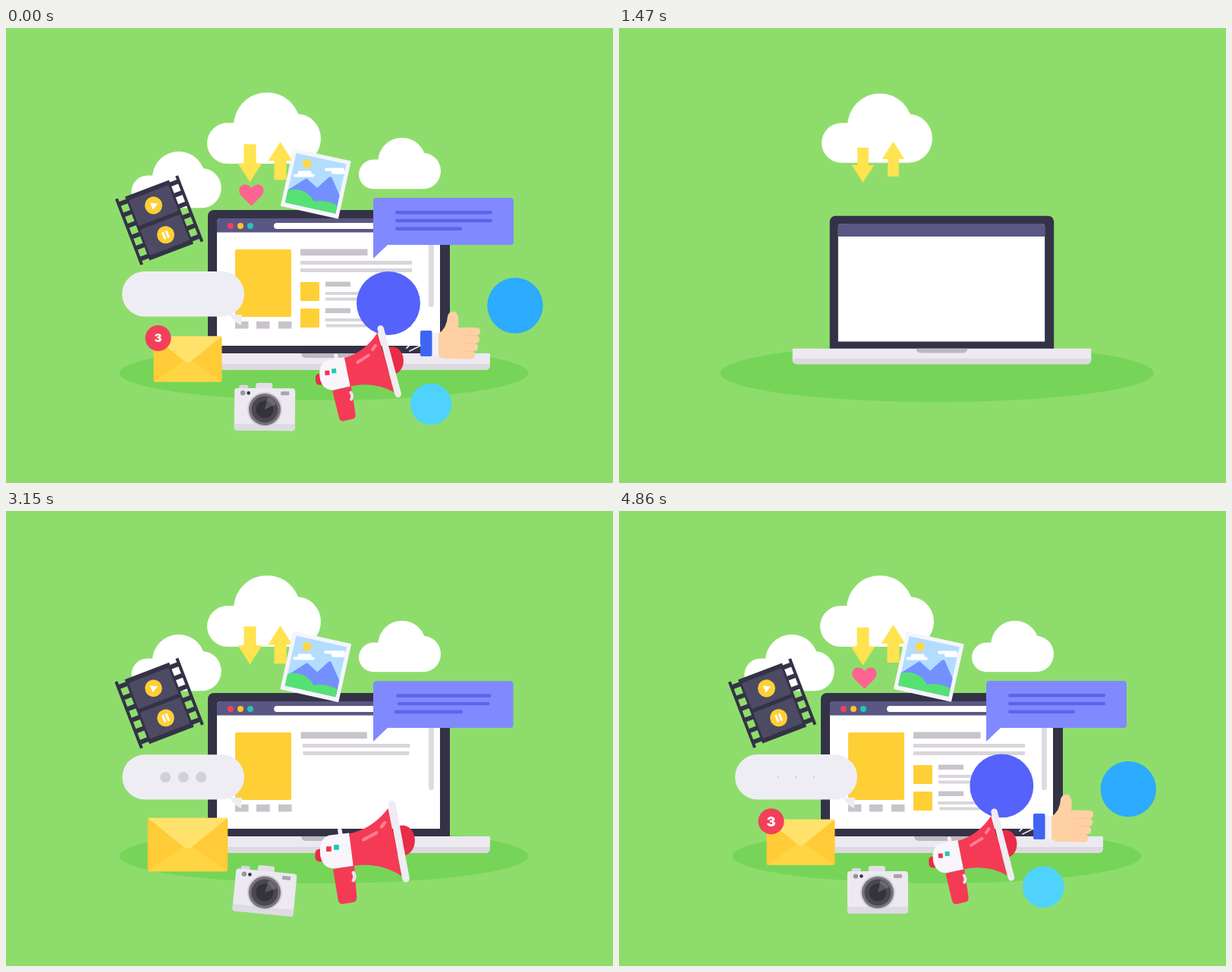
Write an HTML page with a canvas that moves like this. It is 800 px wide and 600 px high and loops after 4890 ms.

```html
<!DOCTYPE html>
<html lang="en">
<head>
<meta charset="utf-8">
<title>Social media laptop</title>
<style>
html, body { margin: 0; width: 100%; height: 100%; overflow: hidden; background: #8edd6c; }
canvas { display: block; width: 800px; height: 600px; }
</style>
</head>
<body>
<canvas id="stage" width="800" height="600"></canvas>
<script>
const c = document.getElementById('stage').getContext('2d');
const LOOP = 4890, CUT = 1310, TAU = Math.PI * 2;
const GREEN = '#8edd6c', YELLOW = '#ffcf36', RED = '#f53a56', TEAL = '#1fc8b8',
      GREY = '#c9c3cb', PALE = '#ece9f1', DARK = '#343247', WHITE = '#fff';
let t = 0;

const clamp = v => Math.max(0, Math.min(1, v));
const easeOut = (start, span) => 1 - (1 - clamp((t - start) / span)) ** 3;

// Elastic entrance: 0 before start, overshoots to about 1.2, settles at 1.
function pop(start) {
  const p = (t - start) / 610;
  return p <= 0 ? 0 : 1 - Math.exp(-3.1 * p) * Math.cos(TAU * p);
}

// Draws in stage coordinates, scaled and turned about (x, y).
function about(x, y, scale, draw, deg = 0) {
  if (scale <= 0) return;
  c.save();
  c.translate(x, y);
  c.rotate(deg * Math.PI / 180);
  c.scale(scale, scale);
  c.translate(-x, -y);
  draw();
  c.restore();
}

// Draws in local coordinates with the origin at (x, y).
function at(x, y, scale, draw, deg = 0) {
  about(x, y, scale, () => { c.translate(x, y); draw(); }, deg);
}

function box(x, y, w, h, r, color) {
  c.fillStyle = color;
  c.beginPath();
  c.roundRect(x, y, w, h, r);
  c.fill();
}

function disc(x, y, r, color, ry = r) {
  if (r <= 0) return;
  c.fillStyle = color;
  c.beginPath();
  c.ellipse(x, y, r, ry, 0, 0, TAU);
  c.fill();
}

function shape(path, color) {
  c.fillStyle = color;
  c.fill(new Path2D(path));
}

function line(path, color, width) {
  c.strokeStyle = color;
  c.lineWidth = width;
  c.lineCap = 'round';
  c.stroke(new Path2D(path));
}

const popBox = (start, x, y, w, h, r, color) =>
  about(x + w / 2, y + h / 2, pop(start), () => box(x, y, w, h, r, color));
const popDisc = (start, x, y, r, color) => disc(x, y, r * pop(start), color);

function cloud(x, y, scale) {
  at(x, y, scale, () => {
    box(-75, -7, 140, 54, 27, WHITE);
    disc(43, 14, 32, WHITE, 33);
    disc(4, -3, 44, WHITE);
  });
}

function arrows() {
  const bob = -3 * Math.sin(TAU * (t - 4860) / 3000);
  const size = easeOut(1380, 160);
  const arrow = 'M-8-25H8V0H16L0 25L-16 0H-8Z';
  at(321.5, 178.5 + bob, size, () => shape(arrow, '#ffe34f'));
  at(361.5, 175 - bob, size, () => shape(arrow, '#ffe34f'), 180);
}

function laptop() {
  about(425, 345.5, pop(1333), () => {
    box(266, 240, 319, 192, [8, 8, 0, 0], DARK);
    box(278, 251, 294, 168, [5, 5, 0, 0], WHITE);
    box(278, 251, 294, 18.5, [5, 5, 0, 0], '#5b5784');
    popDisc(1650, 296, 261, 4, '#f4405a');
    popDisc(1740, 309, 261, 4, '#ffc526');
    popDisc(1850, 322, 261, 4, TEAL);
    popBox(1910, 353, 257, 160, 8, 4, WHITE);
    popBox(1785, 557, 283, 7, 85, 3, '#dedbe2');
    popBox(1785, 302, 292, 74, 89, 2, YELLOW);
    [302, 330, 359].forEach((x, i) => popBox(2230 + 50 * i, x, 387, 17.5, 9.5, 0, GREY));
    popBox(2440, 388, 291.5, 88.5, 8.5, 0, GREY);
    popBox(2512, 388, 307, 147, 5, 0, '#d9d5db');
    popBox(2615, 388, 317, 147, 5, 0, '#d9d5db');
    [335, 370].forEach((y, i) => {
      const start = 3210 + 490 * i;
      popBox(start, 388, y, 25, 25, 1, YELLOW);
      popBox(start + 60, 421, y - .5, 33, 6.5, 0, GREY);
      popBox(start + 345, 421, y + 13, 114, 4, 0, '#d9d5db');
      popBox(start + 480, 421, y + 20.5, 114, 4, 0, '#d9d5db');
    });
    box(213, 429, 425, 22, [1, 1, 6, 6], PALE);
    box(213, 443, 425, 8, [0, 0, 6, 6], '#ddd9e0');
    box(389, 429, 73, 6, [0, 0, 6, 6], '#bdb9bf');
  });
}

function film() {
  at(202, 253.5, pop(2305), () => {
    box(-31, -45, 62, 90, 0, DARK);
    for (const x of [-44.5, 40.5]) box(x, -46.5, 4, 93, 0, DARK);
    for (let i = 0; i < 6; i++) {
      const y = -41.75 + 15.5 * i;
      box(-44, y, 14, 6, 0, DARK);
      box(30, y, 14, 6, 0, DARK);
    }
    box(-28, -39, 56, 36.5, 2, '#4d4a63');
    box(-28, 2.5, 56, 36.5, 2, '#4d4a63');
    popDisc(2495, 0, -21, 11.5, YELLOW);
    popDisc(2480, 1, 21, 11.5, YELLOW);
    at(0, -21, pop(2660), () => shape('M-3-5L6 0L-3 5Z', WHITE));
    at(1, 21, pop(2700), () => shape('M-4-5h3v10h-3zM1-5h3v10h-3z', WHITE));
  }, -21);
}

function photo() {
  at(408.3, 205.2, pop(2230), () => {
    box(-39, -39, 78, 78, 1, '#f6f5fa');
    c.beginPath();
    c.rect(-34, -34, 68, 67);
    c.clip();
    box(-34, -34, 68, 67, 0, '#b3ddff');
    popDisc(2660, -17, -23, 6, '#ffd64a');
    at(-18, -9, pop(2700), () => { box(-14, 0, 28, 4, 2, WHITE); box(-8, -4, 18, 5, 2, WHITE); }, -12);
    at(22, -24, pop(2740), () => { box(-15, -2, 26, 4, 2, WHITE); box(-6, 1, 20, 5, 2, WHITE); }, -12);
    about(12, 34, pop(2570), () =>
      shape('M-36 18L-15-3Q-13-5-11-3L3 5L15-12Q17-14 19-12L36 11V36H-36Z', '#7390ff'));
    about(-20, 34, pop(2510), () => disc(-20, 36, 27, '#56e273', 23));
    about(20, 34, pop(2600), () => disc(20, 38, 29, '#56e273', 18));
  }, 12.5);
}

function chat() {
  about(484, 304, pop(2000), () => {
    box(484, 224, 185, 62, [4, 4, 4, 0], '#808afe');
    shape('M484 285H504L484 304Z', '#808afe');
    [128, 128, 88].forEach((w, i) =>
      popBox(2460 + 130 * i, 513, 241 + 10.7 * i, w, 4.6, 2, '#5d64ec'));
  });
}

function typing() {
  about(313, 392, pop(1920), () => {
    box(153, 321, 161, 59.5, 29.7, '#efedf4');
    shape('M290 378H311L310 392Q300 388 296 379Z', '#efedf4');
    if (t < 2530) return;
    const phase = (t - 2530) % 1410;
    const shrink = 1 - clamp((phase - 780) / 175);
    [210, 233.5, 257].forEach((x, i) =>
      disc(x, 351, 7 * shrink * clamp((phase - 200 * i) / 95), '#d2cfd6'));
  });
}

// Rest-and-lean cycle shared by the megaphone and the envelope.
const lean = () => t < 3690 ? 0 : (1 - Math.cos(TAU * (t - 3690) / 870)) / 2;

function envelope() {
  at(239.5, 440 - 4 * lean(), pop(2950), () => {
    box(-45, -30, 90, 60, 2, '#ffcb36');
    shape('M-44 30L0-2L44 30Z', '#ffd544');
    shape('M-45-30H45L4 3Q0 6-4 3Z', '#ffe26c');
  });
  at(200.5, 412 - 3.5 * lean(), pop(3293), () => {
    disc(0, 0, 17, '#f43f5a');
    if (t < 3680) return;
    const phase = (t - 3680) % 1740;
    at(0, 0, clamp(phase / 180) * (1 - clamp((phase - 1180) / 180)), () => {
      c.fillStyle = WHITE;
      c.font = '900 18px Inter, sans-serif';
      c.textAlign = 'center';
      c.fillText('3', 0, 6.5);
    });
  });
}

function camera() {
  at(341, 502, pop(2700), () => {
    box(-34, -31, 12, 8, 2, '#d9d6e0');
    box(-12, -34, 22, 12, 3, '#e2dfe8');
    box(-40, -27, 80, 56, 4, PALE);
    box(-40, 20, 80, 9, [0, 0, 4, 4], '#dedbe4');
    disc(-29, -20.5, 3.2, '#98949f');
    disc(-21.5, -20.5, 2.3, DARK);
    box(21, -23, 11, 5, 1, '#a9a5b0');
    disc(0, 1, 23, '#d3d0d8');
    disc(0, 1, 21, '#77747d');
    disc(0, 1, 17.5, '#4b4851');
    disc(0, 1, 11.5, '#34323a');
    shape('M0 1L4-15Q12-13 15-6Z', '#ffffff30');
    const flash = 1 - Math.abs(t - 5440) / 130;
    at(32, -22, flash, () => shape('M0-9Q2-2 9 0Q2 2 0 9Q-2 2-9 0Q-2-2 0-9Z', WHITE));
  }, 10 * Math.sin(TAU * (t - 4870) / 2900));
}

function megaphone() {
  about(450, 515, pop(2780), () => {
    disc(515, 443, 14.5, '#e92c49', 18);
    shape('M433 477L458 472L461 510Q461 515 457 516L444 518Q440 518 439 513Z', RED);
    line('M457 481Q460 486 457 490', '#e8e4ec', 4);
    line('M441 431L442 437', '#f5f3f7', 5);
    box(412, 453, 12, 15, 5, '#e92c49');
    shape('M428 437L452 434L457 473L433 476Q421 475 418 461Q416 441 428 437Z', '#f8f6fa');
    shape('M452 435Q480 429 498 405L514 485Q488 468 457 473Z', RED);
    line('M469 442L484 434M490 427L494 422', '#ff7d95', 4);
    line('M502.5 400L519 488', '#efecf3', 8.5);
    box(425, 450, 6, 6, 0, '#f4324e');
    box(434, 448, 6, 6, 0, TEAL);
  }, -5 * lean());
  const phase = (t - 3690) % 870;
  if (t > 4200 && phase > 170 && phase < 440)
    line('M528 422L545 405M532 426L546 419', '#ffffffdd', 1.8);
}

function thumb() {
  const skin = '#ffd0a4';
  about(546, 436, pop(3850), () => {
    box(559, 402, 14, 30, 1, '#f4f2f8');
    box(546, 399, 15.5, 34, 2, '#3f66f2');
    shape('M570 403Q581 396 582 380Q584 373 591 374Q598 377 596 395H606V436H580' +
      'Q573 436 570 432Z', skin);
    [625, 624, 622, 618].forEach((right, i) => {
      box(592, 395 + 10.3 * i, right - 592, 10.6, 5, skin);
      if (i) line(`M603 ${395 + 10.3 * i}H${right - 6}`, '#f8c496', 1);
    });
  });
}

function heart() {
  const beat = .99 - .025 * Math.cos(TAU * (t - 4875) / 790);
  at(323.5, 220, pop(3385) * beat, () =>
    shape('M0 15L-14 1C-20-6-15-14-9-14Q-3-14 0-9Q3-14 9-14C15-14 20-6 14 1Z', '#ff6391'));
}

// Badge drifting along a slow arc; coefficients are px per ms and per ms squared.
function badge(start, x, y, r, color, vx, ax, vy, ay) {
  const u = t - LOOP;
  popDisc(start, x + vx * u + ax * u * u, y + vy * u + ay * u * u, r, color);
}

function scene() {
  const spread = pop(1305);
  disc(419, 455, 269.5 * spread, '#76d558', 36 * spread);
  cloud(224.5, 200, .79 * pop(1767));
  cloud(340, 132, easeOut(1300, 245));
  cloud(519, 178.5, .72 * easeOut(1740, 290));
  arrows();
  laptop();
  film();
  photo();
  chat();
  typing();
  heart();
  envelope();
  badge(3582, 504, 363, 42, '#5562fb', -.0108, 2.8e-6, .0213, 1.8e-6);
  badge(3232, 671, 366, 36.7, '#2cabff', -.01, -2.7e-6, -.0225, 0);
  thumb();
  badge(3220, 560, 496, 27.3, '#4fd3fd', .0224, 0, .0072, -3e-6);
  megaphone();
  camera();
}

function frame(now) {
  const clock = now % LOOP;
  t = clock < CUT ? clock + LOOP : clock;
  c.fillStyle = GREEN;
  c.fillRect(0, 0, 800, 600);
  scene();
  // A round green wipe from the left clears the stage.
  if (clock > 1110 && clock < CUT) disc(-350, 300, 345 + 4.5 * (clock - 1110), GREEN);
  requestAnimationFrame(frame);
}
requestAnimationFrame(frame);
</script>
</body>
</html>
```
